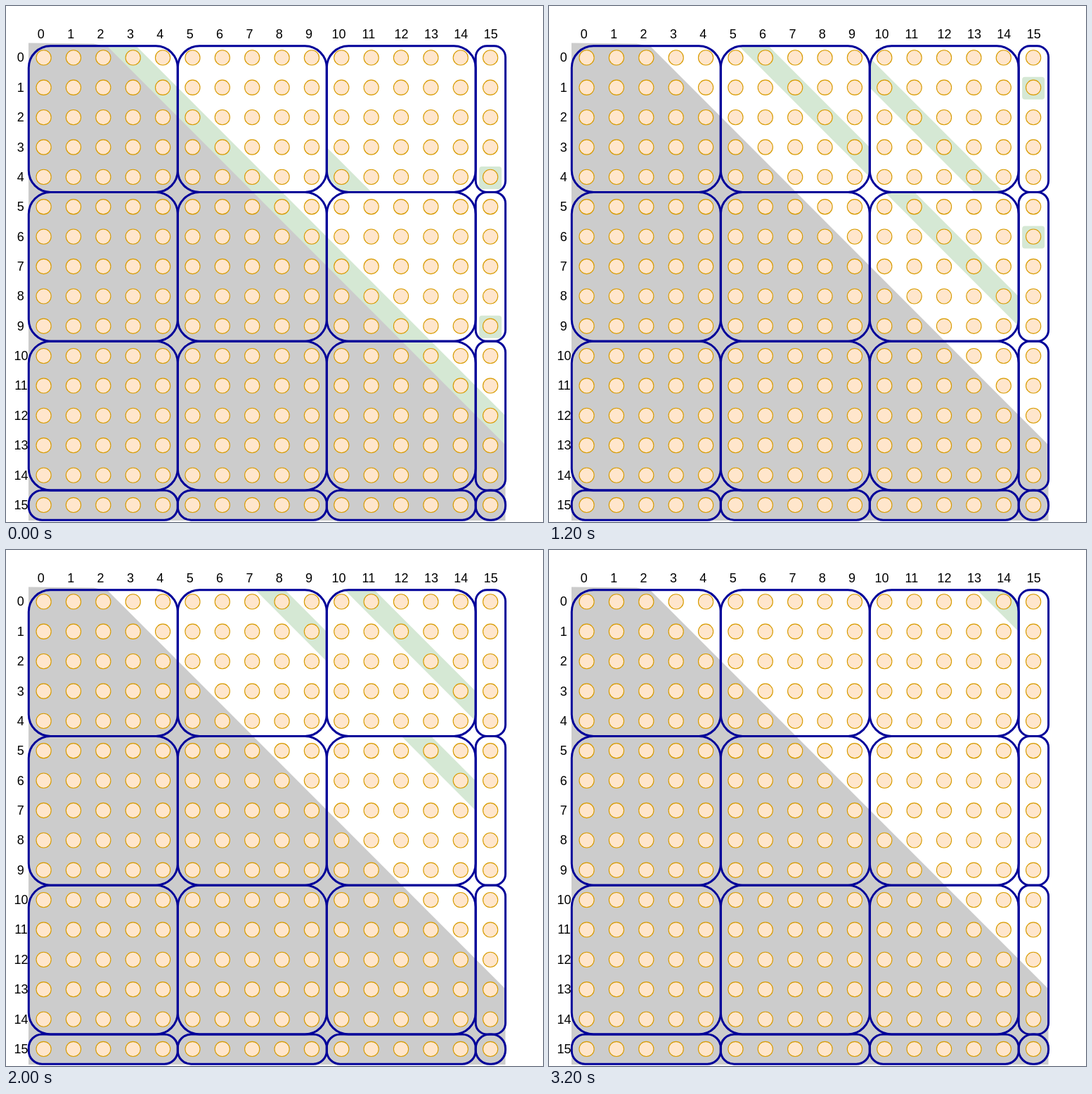
An HTML page that plays this animation: 764x733 px, repeating every 3600 ms.

```html
<!DOCTYPE html>
<html lang="en">
<head>
<meta charset="utf-8">
<title>Tiled matrix wavefront</title>
<style>
  html, body { margin: 0; width: 100%; height: 100%; overflow: hidden; background: #fff; }
  svg { display: block; }
  text { font: 18px "Liberation Sans", Arial, sans-serif; text-anchor: middle; }
</style>
</head>
<body>
<svg id="stage" width="764" height="733" viewBox="0 0 764 733"></svg>
<script>
const STEP_MS = 400, STEPS = 9;
const N = 16, PITCH = 42.37, X0 = 53.6, Y0 = 73.4;
const GREEN = '#d5e8d4', BLUE = '#000099';
const xEdges = [32.3, 244.3, 456.3, 668.2, 710.6];
const yEdges = [56.8, 264.4, 476.2, 688, 730.2];
const stage = document.getElementById('stage');

function add(parent, tag, attrs, text) {
  const node = document.createElementNS('http://www.w3.org/2000/svg', tag);
  for (const key in attrs) node.setAttribute(key, attrs[key]);
  if (text !== undefined) node.textContent = text;
  parent.appendChild(node);
  return node;
}

const colX = c => X0 + c * PITCH;
const rowY = r => Y0 + r * PITCH;

function tileBox(i, j) {
  const radius = i === 3 ? (j === 3 ? 20 : 19) : (j === 3 ? 16 : 31);
  return {
    x: xEdges[j], y: yEdges[i],
    width: xEdges[j + 1] - xEdges[j],
    height: yEdges[i + 1] - yEdges[i],
    rx: radius
  };
}

// First active diagonal (column - row) of a tile on or above the block diagonal.
const firstDiagonal = (i, j) => j - i < 2 ? 3 : 1 + 5 * (j - i - 1);

const defs = add(stage, 'defs', {});
const bandLayer = add(stage, 'g', { stroke: GREEN, 'stroke-width': PITCH / Math.SQRT2, fill: 'none' });
const markLayer = add(stage, 'g', { fill: GREEN });
add(stage, 'path', { d: 'M32 52.5L125 53.5L145 58L710.5 623.5V731H32Z', fill: '#ccc' });

const bands = [], marks = [];
for (let i = 0; i < 3; i++) {
  for (let j = i; j < 4; j++) {
    const first = i === 0 && j === 3 ? 11 : firstDiagonal(i, j);
    if (j === 3) {
      const node = add(markLayer, 'rect', { x: colX(15) - 16, width: 32, height: 32, rx: 4 });
      marks.push({ node, i, first });
    }
    if (j < 3 || i === 2) {
      const id = `tile${i}${j}`;
      add(add(defs, 'clipPath', { id }), 'rect', tileBox(i, j));
      const node = add(bandLayer, 'path', {});
      const group = add(bandLayer, 'g', { 'clip-path': `url(#${id})` });
      group.appendChild(node);
      bands.push({ node, first, lastColumn: j === 3 });
    }
  }
}

const tiles = add(stage, 'g', { fill: 'none', stroke: BLUE, 'stroke-width': 3 });
for (let i = 0; i < 4; i++)
  for (let j = 0; j < 4; j++) add(tiles, 'rect', tileBox(i, j));

const dots = add(stage, 'g', { fill: '#ffe6cc', stroke: '#d79b00', 'stroke-width': 1.1 });
for (let r = 0; r < N; r++)
  for (let c = 0; c < N; c++) add(dots, 'circle', { cx: colX(c), cy: rowY(r), r: 10.6 });

for (let n = 0; n < N; n++) {
  add(stage, 'text', { x: colX(n) - (n < 12 ? 3.8 : -0.5), y: 45.6 }, n);
  add(stage, 'text', { x: n < 10 ? 20.8 : 21.5, y: rowY(n) + 6 }, n);
}

function render(time) {
  const step = Math.floor(time / STEP_MS) % STEPS;
  for (const { node, first, lastColumn } of bands) {
    const d = first + step;
    node.setAttribute('d', `M${colX(d - 2)} ${rowY(-2)}L${colX(d + 18)} ${rowY(18)}`);
    node.style.display = lastColumn && step > 1 ? 'none' : '';
  }
  for (const { node, i, first } of marks) {
    const row = 15 - first - step;
    const inside = row >= 5 * i && row < 5 * i + 5;
    node.setAttribute('y', rowY(row) - 15);
    node.style.display = inside && (i < 2 || step > 1) ? '' : 'none';
  }
}

const start = performance.now();
function tick() {
  render(performance.now() - start);
  requestAnimationFrame(tick);
}
tick();
</script>
</body>
</html>
```
